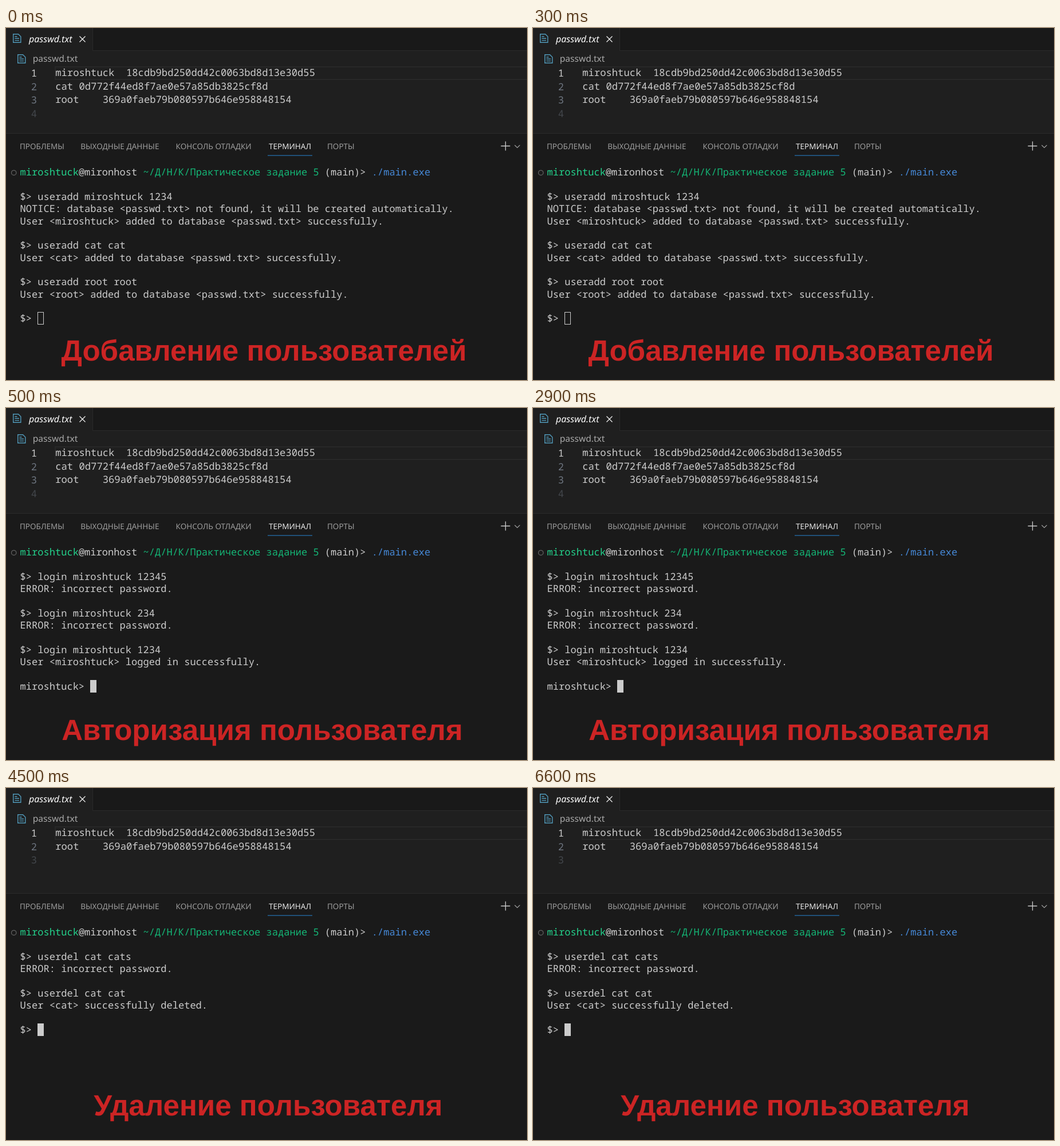
An HTML page that plays this animation: 910 px wide and 616 px high, repeating every 8000 ms.

```html
<!DOCTYPE html>
<html lang="ru">
<head>
<meta charset="utf-8">
<title>passwd.txt</title>
<style>
  html, body { margin: 0; width: 100%; height: 100%; overflow: hidden; background: #1a1a1a; }
  svg { display: block; width: 910px; height: 616px; }
  text { white-space: pre; text-rendering: geometricPrecision; fill: #ccc; }
  .ui { font-family: "Noto Sans", sans-serif; }
  .mono { font-family: "Noto Sans Mono", monospace; }
  .editor { font-size: 17.2px; }
  .terminal { font-size: 17.07px; }
  .number { text-anchor: end; fill: #6e7681; }
  .number.active { fill: #ccc; }
  .number.last { fill: #43474c; }
  .tab { font-size: 13.5px; fill: #9d9d9d; }
  .tab.active { fill: #e7e7e7; }
  .caption { font: bold 51.1px "Liberation Sans", Arial, sans-serif; text-anchor: middle; fill: #cc2424; }
  .line { fill: none; stroke: #ccc; stroke-width: 1.3; }
  .icon { fill: none; stroke: #519aba; stroke-width: 1.4; }
  .scene { opacity: 0; }
</style>
</head>
<body>
<svg id="stage" viewBox="0 0 910 616">
  <defs>
    <g id="file" class="icon">
      <path d="M.7 .7H9.5L13.8 5V15.3H.7ZM3.4 5H7.5M3.4 8.2H11M3.4 11.6H11"/>
    </g>
  </defs>
  <rect width="910" height="184" fill="#1f1f1f"/>
  <rect x="152" width="758" height="39" fill="#191919"/>
  <path d="M151.5 0V39.5H910M0 184.5H910" fill="none" stroke="#2a2a2a"/>
  <path d="M910 68H86V90H910" fill="none" stroke="#2b2b2b" stroke-width="1.5"/>
  <use href="#file" x="12" y="10"/>
  <use href="#file" x="20" y="46"/>
  <path class="line" d="M128.5 14.5L138.5 24.5M138.5 14.5L128.5 24.5" style="stroke:#eee"/>
  <path class="line" d="M864.5 206.5H880.5M872.5 198.5V214.5"/>
  <path class="line" d="M888.5 205L893 209.5L897.5 205" style="stroke:#a0a0a0;stroke-width:1.1"/>
  <rect x="457" y="222.5" width="78" height="1.2" fill="#2474b5"/>
  <circle cx="13.7" cy="253.3" r="4.2" fill="none" stroke="#606060" stroke-width="1.3"/>
</svg>
<script>
const DURATION = 8000;
const COLUMN = 10.24, ROW = 21.33, LEFT = 24.5;
const USER = "miroshtuck", HOST = "mironhost";
const stage = document.getElementById("stage");

const users = {
  [USER]: `${USER}  18cdb9bd250dd42c0063bd8d13e30d55`,
  cat: "cat 0d772f44ed8f7ae0e57a85db3825cf8d",
  root: "root    369a0faeb79b080597b646e958848154",
};

const scenes = [
  {
    start: 0, end: 500,
    file: [USER, "cat", "root"],
    caption: ["Добавление пользователей", 450.5, 582],
    hollowCursor: true,
    output: [
      `$> useradd ${USER} 1234`,
      "NOTICE: database <passwd.txt> not found, it will be created automatically.",
      `User <${USER}> added to database <passwd.txt> successfully.`,
      "",
      "$> useradd cat cat",
      "User <cat> added to database <passwd.txt> successfully.",
      "",
      "$> useradd root root",
      "User <root> added to database <passwd.txt> successfully.",
      "",
      "$> ",
    ],
  },
  {
    start: 500, end: 4500,
    file: [USER, "cat", "root"],
    caption: ["Авторизация пользователя", 447.5, 581],
    output: [
      `$> login ${USER} 12345`,
      "ERROR: incorrect password.",
      "",
      `$> login ${USER} 234`,
      "ERROR: incorrect password.",
      "",
      `$> login ${USER} 1234`,
      `User <${USER}> logged in successfully.`,
      "",
      `${USER}> `,
    ],
  },
  {
    start: 4500, end: DURATION,
    file: [USER, "root"],
    caption: ["Удаление пользователя", 458, 573],
    output: [
      "$> userdel cat cats",
      "ERROR: incorrect password.",
      "",
      "$> userdel cat cat",
      "User <cat> successfully deleted.",
      "",
      "$> ",
    ],
  },
];

function add(parent, tag, attributes, content = "") {
  const node = document.createElementNS("http://www.w3.org/2000/svg", tag);
  for (const [name, value] of Object.entries(attributes)) node.setAttribute(name, value);
  node.textContent = content;
  return parent.appendChild(node);
}

const addText = (parent, content, x, y, className, style = "") =>
  add(parent, "text", { x, y, class: className, style }, content);

const editorY = row => 84.2 + row * 23.6;
const terminalY = row => 258.4 + row * ROW;

function drawFrame() {
  addText(stage, "passwd.txt", 40, 25, "ui", "font-size:16px;font-style:italic;fill:#fff");
  addText(stage, "passwd.txt", 46.7, 59, "ui", "font-size:15.6px;fill:#a9a9a9");
  const tabs = [["ПРОБЛЕМЫ", 24], ["ВЫХОДНЫЕ ДАННЫЕ", 130.2], ["КОНСОЛЬ ОТЛАДКИ", 296.6],
    ["ТЕРМИНАЛ", 459], ["ПОРТЫ", 561]];
  for (const [label, x] of tabs) {
    addText(stage, label, x, 212, label === "ТЕРМИНАЛ" ? "ui tab active" : "ui tab");
  }
  const prompt = addText(stage, "", LEFT, terminalY(0), "mono terminal");
  const parts = [[USER, "#23d18b"], [`@${HOST} `, "#ccc"],
    ["~/Д/Н/К/Практическое задание 5", "#14b877"], [" (main)> ", "#ccc"], ["./main.exe", "#4689d8"]];
  for (const [content, color] of parts) add(prompt, "tspan", { style: `fill:${color}` }, content);
}

function drawScene({ file, output, caption, hollowCursor }) {
  const group = add(stage, "g", { class: "scene" });
  for (let row = 0; row <= file.length; row++) {
    const state = row === 0 ? "active" : row === file.length ? "last" : "";
    addText(group, row + 1, 54, editorY(row) + 0.8, `mono editor number ${state}`);
    if (row < file.length) addText(group, users[file[row]], 86.2, editorY(row), "mono editor");
  }
  output.forEach((line, row) => {
    if (line) addText(group, line, LEFT, terminalY(row + 2), "mono terminal");
  });

  const lastLine = output[output.length - 1];
  const x = Math.floor(LEFT + lastLine.length * COLUMN);
  const y = Math.floor(terminalY(output.length + 1) - 16.7);
  add(group, "rect", hollowCursor
    ? { x: x + 0.5, y: y + 0.5, width: 10, height: 21, class: "line", style: "stroke-width:1" }
    : { x, y, width: 11, height: 22, fill: "#ccc" });
  addText(group, ...caption, "caption");
  return group;
}

drawFrame();
const origin = document.timeline.currentTime ?? 0;
for (const scene of scenes) {
  const steps = [[0, scene.start === 0], [scene.start, true], [scene.end, false], [DURATION, false]];
  const animation = drawScene(scene).animate(
    steps.map(([time, shown]) => ({ offset: time / DURATION, opacity: +shown, easing: "step-end" })),
    { duration: DURATION, iterations: Infinity });
  animation.startTime = origin;
}
</script>
</body>
</html>
```
